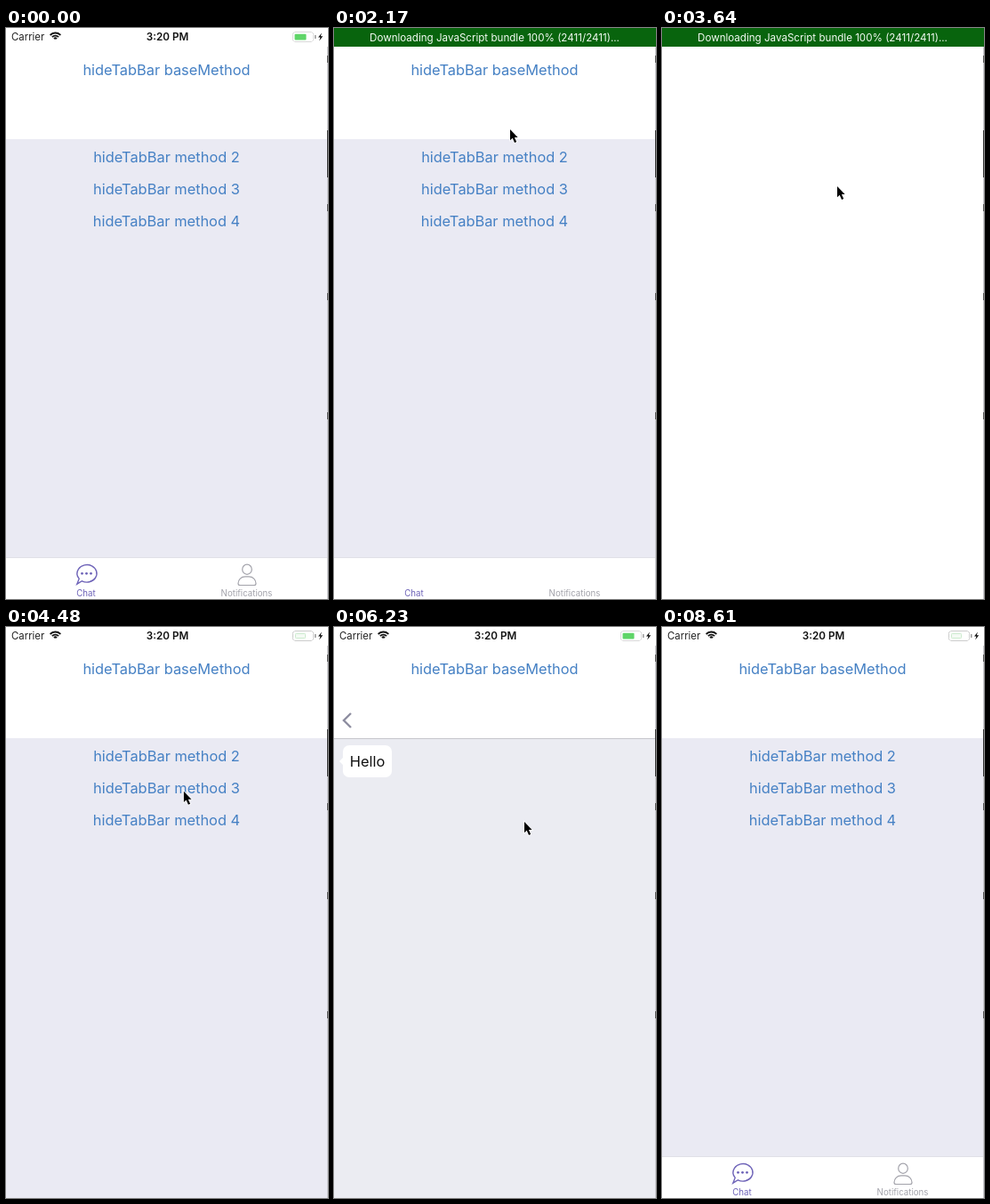
Write an HTML page with a canvas that moves like this. It is 362 by 642 pixels and loops after 8680 ms.

```html
<!DOCTYPE html>
<html lang="en">
<head>
<meta charset="utf-8">
<title>Hide tab bar demo</title>
<style>
html, body { margin: 0; width: 100%; height: 100%; overflow: hidden; background: #fff; }
canvas { display: block; width: 362px; height: 642px; }
</style>
</head>
<body>
<canvas id="stage" width="362" height="642"></canvas>
<script>
const W = 362, H = 642, LOOP = 8680, STEP = 70;
const MID = 180.5, NAV = 125, TABS = 596;
const PUSH = 350, POP = 450, GLIDE = 420, HIDE_LEAD = 110;
const BLANK_END = 350, BAR_END = 420, ICONS_AT = 630;
const BLUE = '#4580c4', PURPLE = '#6e63b8', GREY = '#a2a2aa';
const FONT = 'Inter, Roboto, sans-serif';
const ctx = document.getElementById('stage').getContext('2d');

// Each round taps a link, may go back, then may reload the app
const backButton = [21, 108];
const rounds = [
  { tap: 630, link: [190, 50], back: 1190, reload: 1785, rest: [198, 114] },
  { tap: 2590, link: [196, 145], back: 2950, reload: 3430, rest: [197, 178] },
  { tap: 4530, link: [200, 185], reload: 4970, rest: [214, 219] },
  { tap: 5670, link: [214, 219], back: 6904 }
];

// Pointer stops follow from the rounds
const stops = [{ t: 140, at: [W, 330] }];
for (const r of rounds) {
  stops.push({ t: r.tap, at: r.link });
  if (r.back) stops.push({ t: r.back, at: backButton });
  if (r.reload) stops.push({ t: r.reload, at: r.rest });
}
stops.push({ t: 8330, at: [W, 560] });

const clamp = v => Math.max(0, Math.min(1, v));
const smooth = p => p * p * (3 - 2 * p);
const mix = (a, b, p) => a + (b - a) * p;

function rect(x, y, w, h, fill) {
  ctx.fillStyle = fill;
  ctx.fillRect(x, y, w, h);
}

function text(str, x, y, size, fill, align = 'center', weight = 400) {
  ctx.font = `${weight} ${size}px ${FONT}`;
  ctx.textAlign = align;
  ctx.fillStyle = fill;
  ctx.fillText(str, x, y);
}

const link = (str, x, y) => text(str, x, y, 16.4, BLUE);

function paint(fill, stroke, width = 1) {
  if (stroke) {
    ctx.strokeStyle = stroke;
    ctx.lineWidth = width;
    ctx.stroke();
  }
  if (fill) {
    ctx.fillStyle = fill;
    ctx.fill();
  }
}

function poly(points, fill, stroke, width) {
  ctx.beginPath();
  for (const [x, y] of points) ctx.lineTo(x, y);
  if (fill) ctx.closePath();
  paint(fill, stroke, width);
}

function oval(x, y, rx, ry, fill, stroke, width) {
  ctx.beginPath();
  ctx.ellipse(x, y, rx, ry, 0, 0, 2 * Math.PI);
  paint(fill, stroke, width);
}

function rounded(x, y, w, h, r, fill, stroke, width) {
  ctx.beginPath();
  ctx.roundRect(x, y, w, h, r);
  paint(fill, stroke, width);
}

function battery(pale) {
  rounded(322.5, 5, 23, 10, 2.5, '#fff', pale ? '#999' : '#b4b4b4');
  if (pale) rounded(325.5, 7.5, 11, 5, 1, '#f4faf4', '#a5dca8');
  else rounded(324.5, 6.8, 13, 6.6, 1, '#5fd568');
  rect(347, 8, 1.5, 4, '#999');
  poly([[355, 5.5], [351, 10.6], [353.4, 10.6], [352.2, 14.5], [356.2, 9.2], [353.8, 9.2]], '#111');
}

function statusBar(loading, pale) {
  if (loading) {
    rect(0, 0, W, 21, '#08640d');
    text('Downloading JavaScript bundle 100% (2411/2411)...', MID, 15, 11.6, '#f4fbf4');
    return;
  }
  text('Carrier', 6, 14, 11.4, '#222', 'left');
  text('3:20 PM', 181.5, 14, 11.7, '#111', 'center', 600);
  for (const r of [2, 4.9, 8]) {
    ctx.beginPath();
    ctx.arc(55.5, 13.5, r, -Math.PI * 0.76, -Math.PI * 0.24);
    paint(null, '#111', 1.9);
  }
  battery(pale);
}

function list(dx) {
  rect(0, NAV, W, H - NAV, '#eaeaf3');
  for (let n = 2; n <= 4; n++) link('hideTabBar method ' + n, MID + dx, 79 + n * 36);
}

function chat(x) {
  const shade = ctx.createLinearGradient(x - 9, 0, x, 0);
  shade.addColorStop(0, 'rgba(0,0,0,0)');
  shade.addColorStop(1, 'rgba(0,0,0,0.12)');
  rect(x - 9, NAV, 9, H - NAV, shade);
  rect(x, NAV, W - x, H - NAV, '#ebecf2');
  rounded(x + 10, 133, 55, 36, 7, '#fff');
  poly([[x + 11, 146], [x + 6, 151], [x + 11, 156]], '#fff');
  text('Hello', x + 37.5, 157, 16.4, '#111');
}

function backArrow(alpha) {
  ctx.globalAlpha = alpha;
  poly([[19, 97], [11, 105], [19, 113]], null, '#8d8da0', 2.4);
  ctx.globalAlpha = 1;
}

function tabBar(icons) {
  rect(0, TABS, W, H - TABS, '#fff');
  rect(0, TABS - 0.5, W, 0.5, '#d4d4da');
  text('Chat', 90, 639, 9.7, PURPLE);
  text('Notifications', 270.5, 639, 9.7, GREY);
  if (!icons) return;

  ctx.beginPath();
  ctx.ellipse(91, 613.3, 11, 9.8, 0, 2.1, 2.5, true);
  ctx.lineTo(79.8, 625.2);
  ctx.closePath();
  paint(null, PURPLE, 1.4);
  for (let i = -1; i <= 1; i++) oval(90.5 + i * 5, 613.3, 1.4, 1.4, PURPLE);

  oval(271, 608.7, 5.3, 5.6, null, GREY, 1.2);
  rounded(261, 616.8, 20, 9.7, [8, 8, 2, 2], null, GREY, 1.2);
}

// Sliver of the desktop behind the simulator
function edge() {
  rect(361, 21, 1, H - 21, '#c9c9cd');
  rect(361, 115, 1, 53, '#333');
  for (const y of [31, 198, 298, 432]) rect(361, y, 1, 8, '#555');
}

function drawPointer(t) {
  const i = stops.findIndex(s => s.t > t);
  if (i < 1) return;
  const from = stops[i - 1], to = stops[i];
  const glide = Math.min(GLIDE, to.t - from.t);
  const p = smooth(clamp(1 - (to.t - t) / glide));
  ctx.save();
  ctx.translate(mix(from.at[0], to.at[0], p), mix(from.at[1], to.at[1], p));
  ctx.scale(0.9, 0.9);
  poly([[0, 0], [0, 13.5], [3, 10.8], [5.6, 16.6], [8, 15.5], [5.5, 9.9], [9.6, 9.9]], '#000', '#fff', 1.6);
  ctx.restore();
}

// 0 = list, 1 = chat
function chatShare(t, r) {
  if (!r) return 0;
  if (r.back && t >= r.back) return 1 - smooth(clamp((t - r.back) / POP));
  return smooth(clamp((t - r.tap) / PUSH));
}

function draw(t) {
  const sinceReload = Math.min(...rounds.map(r => t >= r.reload ? t - r.reload : Infinity));
  const blank = sinceReload >= STEP && sinceReload < BLANK_END;
  const visit = rounds.find(r => t >= r.tap && t < (r.back ? r.back + POP : r.reload + STEP));
  const share = chatShare(t, visit);

  rect(0, 0, W, H, '#fff');
  if (!blank) {
    list(-108 * share);
    if (share > 0) {
      rect(0, NAV, W, H - NAV, `rgba(0,0,0,${0.13 * share})`);
      chat(W * (1 - share));
      rect(0, NAV, W, 1, '#c6c6cc');
      backArrow(t >= visit.back ? 0.2 * share : share);
    }
    link('hideTabBar baseMethod', MID, 53);
    const hidden = rounds.some(r => t >= r.tap - HIDE_LEAD && t < (r.back || r.reload + STEP));
    if (!hidden) tabBar(sinceReload >= ICONS_AT);
  }
  edge();
  statusBar(sinceReload < BAR_END, t > LOOP / 2 && share === 0);
  drawPointer(t);
}

const start = performance.now();
function tick() {
  const t = (performance.now() - start) % LOOP;
  draw(Math.floor(t / STEP) * STEP);
  requestAnimationFrame(tick);
}
tick();
</script>
</body>
</html>
```
